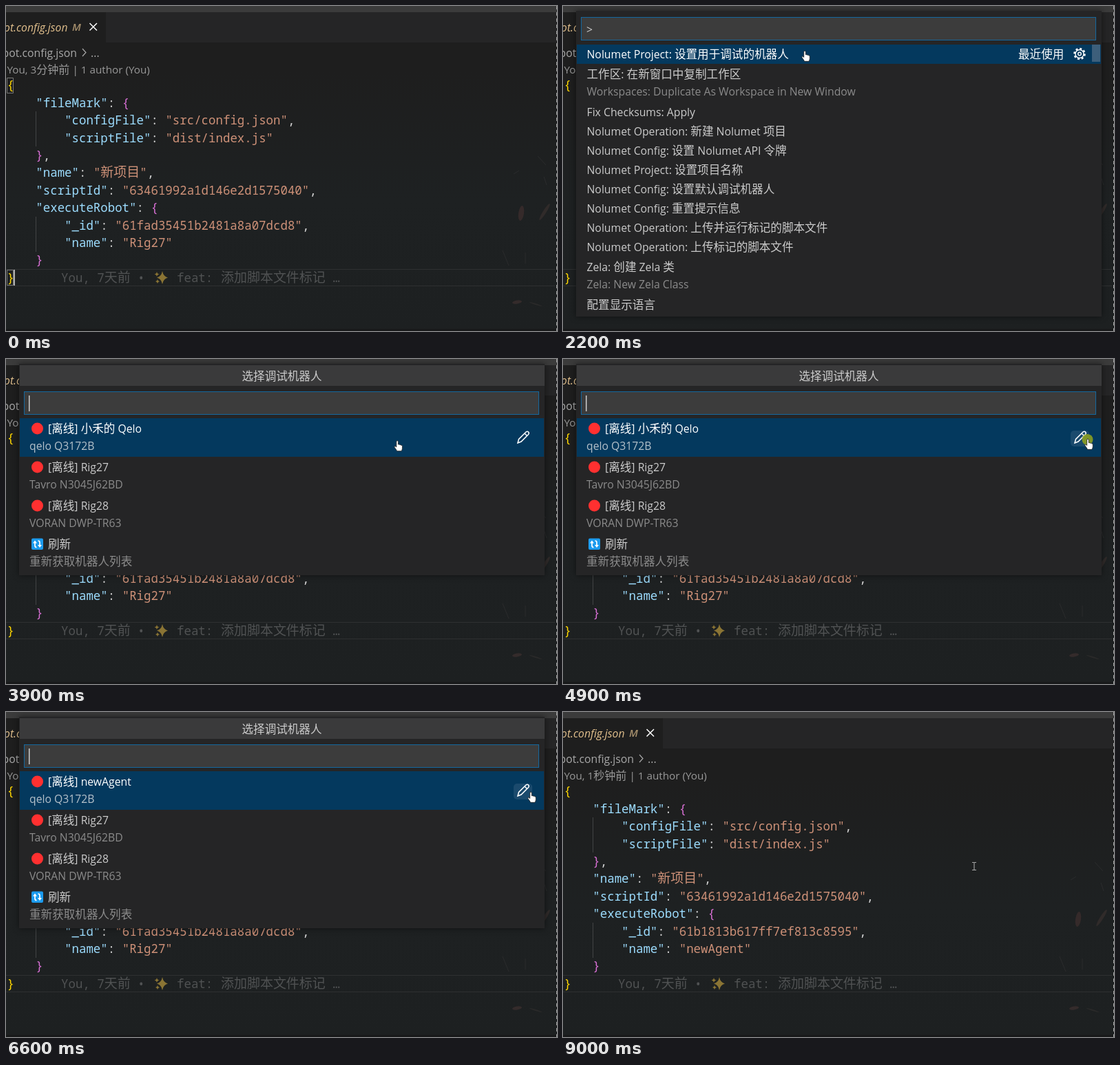
An HTML page that plays this animation: 800x472 px, repeating every 9.1 s.

```html
<!DOCTYPE html>
<html lang="zh">
<head>
<meta charset="utf-8">
<style>
  html, body { margin: 0; width: 100%; height: 100%; overflow: hidden; background: #1e1e1e; }
  svg { display: block; }
  text { white-space: pre; font-family: "Open Sans", "Noto Sans CJK SC", sans-serif; }
  .cjk { font-family: "Noto Sans CJK SC", sans-serif; font-size: 1.053em; }
  .mono { font-family: "Noto Sans Mono", "Noto Sans CJK SC", monospace; font-weight: 500; }
  .mono .cjk { font-size: 1.09em; font-weight: 300; }
  .italic { font-style: italic; }
  .end { text-anchor: end; }
  .mid { text-anchor: middle; }
  .shadow { filter: drop-shadow(0 0 5px rgba(0, 0, 0, .5)); }
</style>
</head>
<body>
<svg id="stage" width="800" height="472" viewBox="0 0 800 472"></svg>
<script>
const LOOP = 9100, STEP = 100, COL = 10.45;
const stage = document.getElementById('stage');

// Pointer path: time, x, y
const path = [
  [1600, 590, 222], [2100, 351, 66], [2800, 351, 66], [3500, 420, 112], [4100, 620, 122],
  [4700, 762, 117], [6600, 762, 117], [7500, 560, 108], [8000, 560, 108], [8800, 597, 224], [9100, 597, 224]
];
const clicks = [2400, 4900, 7700];

// Palette entries: label and optional detail
const commands = [
  ['Nolumet Project: 设置用于调试的机器人'],
  ['工作区: 在新窗口中复制工作区', 'Workspaces: Duplicate As Workspace in New Window'],
  ['Fix Checksums: Apply'],
  ['Nolumet Operation: 新建 Nolumet 项目'],
  ['Nolumet Config: 设置 Nolumet API 令牌'],
  ['Nolumet Project: 设置项目名称'],
  ['Nolumet Config: 设置默认调试机器人'],
  ['Nolumet Config: 重置提示信息'],
  ['Nolumet Operation: 上传并运行标记的脚本文件'],
  ['Nolumet Operation: 上传标记的脚本文件'],
  ['Zela: 创建 Zela 类', 'Zela: New Zela Class'],
  ['配置显示语言']
];

const rect = (x, y, w, h, fill, more = '') =>
  `<rect x="${x}" y="${y}" width="${w}" height="${h}" fill="${fill}" ${more}/>`;
const stroke = (d, color, width = 1, more = '') =>
  `<path d="${d}" fill="none" stroke="${color}" stroke-width="${width}" ${more}/>`;
const shape = (d, fill, more = '') => `<path d="${d}" fill="${fill}" ${more}/>`;
const wrap = s => s.replace(/[\u3000-\u9fff]+/g, '<tspan class="cjk">$&</tspan>');
const text = (x, y, s, fill = '#ccc', size = 15.75, cls = '', more = '') =>
  `<text x="${x}" y="${y}" fill="${fill}" font-size="${size}" class="${cls}" ${more}>${wrap(s)}</text>`;
const mono = (x, y, s, fill) => text(x, y, s, fill, 17.42, 'mono');

function codeLine(s, i) {
  const tokens = s.trim().match(/"[^"]*"|[{}]|[^"{}]+/g);
  const y = 121.3 + i * 25.4;
  let x = 1.5 + COL * s.search(/\S/);
  return tokens.map((tok, k) => {
    let color = '#d4d4d4';
    if (tok[0] === '"') color = k === 0 ? '#9cdcfe' : '#ce9178';
    else if (/[{}]/.test(tok)) color = i % 11 ? '#da70d6' : '#ffd700';
    const out = mono(x, y, tok, color);
    for (const ch of tok) x += ch > '\u3000' ? 19 : COL;
    return out;
  }).join('');
}

function backdrop() {
  const blot = (x, y, rx, ry, turn, fill) =>
    `<ellipse rx="${rx}" ry="${ry}" transform="translate(${x} ${y}) rotate(${turn})" fill="${fill}"/>`;
  return `<defs><linearGradient id="bg" x2="0" y2="1"><stop offset=".2" stop-color="#1e1e1e"/>
    <stop offset=".6" stop-color="#1e2122"/><stop offset="1" stop-color="#1d2021"/></linearGradient></defs>` +
    rect(0, 0, 800, 472, 'url(#bg)') +
    blot(748, 301, 4, 11, 8, '#352a2a') + blot(782, 299, 2.5, 14, 32, '#302b2a') +
    blot(742, 430, 7, 2.5, -8, '#342b2b') + blot(769, 433, 10, 1, 18, '#2a2a2a') +
    stroke('M721 355l9 22M754 358v16M737 244l8-5M772 218l12 13M781 248l4 12', '#2b2c2d');
}

function editor(t) {
  const saved = t >= 7900;
  const lines = [
    '{', '    "fileMark": {', '        "configFile": "src/config.json",',
    '        "scriptFile": "dist/index.js"', '    },', '    "name": "新项目",',
    '    "scriptId": "63461992a1d146e2d1575040",', '    "executeRobot": {',
    `        "_id": "${saved ? '61b1813b617ff7ef813c8595' : '61fad35451b2481a8a07dcd8'}",`,
    `        "name": "${saved ? 'newAgent' : 'Rig27'}"`, '    }', '}'
  ];
  const dim = '#505253';
  let out = backdrop() +
    rect(0, 0, 800, 9, '#3b3b3b') + rect(145, 9, 655, 44, '#252526') + rect(0, 9, 145, 44, '#1e1e1e') +
    text(89.5, 37, 'bot.config.json', '#e2c08d', 15.75, 'italic end') +
    text(96, 36, 'M', '#a58f6c', 15, 'italic', 'font-weight="600"') +
    stroke('M121.5 25l10.5 10.5M132 25l-10.5 10.5', '#fff', 1.5) +
    text(103, 73.5, 'bot.config.json', '#a9a9a9', 15.75, 'end') +
    stroke('M111 62l5 5.5l-5 5.5', '#a9a9a9', 1.2) + text(123, 73.5, '...', '#a9a9a9') +
    text(1.5, 97.5, `You, ${t >= 8700 ? '1秒钟前' : '3分钟前'} | 1 author (You)`, '#999', 15.25) +
    stroke('M0 382.5H797M0 406.5H797', '#2e3031') +
    stroke('M43.5 153v51M43.5 306v51', '#424445') +
    lines.map(codeLine).join('') +
    mono(80, 400.7, 'You, 7天前 •', dim) + mono(248, 400.7, 'feat:', dim) +
    mono(312, 400.7, '添加脚本文件标记', dim) + mono(474.5, 400.7, '…', dim) +
    shape('M227 385q1.5 8 8 9.5q-6.5 1.5-8 9.5q-1.5-8-8-9.5q6.5-1.5 8-9.5z' +
      'M219 386q.5 3 3.5 3.5q-3 .5-3.5 3.5q-.5-3-3.5-3.5q3-.5 3.5-3.5z' +
      'M220 397q.5 2.5 3 3q-2.5 .5-3 3q-.5-2.5-3-3q2.5-.5 3-3z', '#8a7434');
  if (t < 100) {
    out += stroke('M1.5 104.5h9v22h-9zM1.5 383.5h9v22h-9z', '#777') + rect(11, 383, 2, 23, '#aeafad');
  }
  return out + rect(0, 469, 800, 3, '#18191a') + stroke('M799.5 0V472', '#aaa', 1, 'stroke-dasharray="5 4"');
}

const panel = bottom => rect(19, 7, 763, bottom - 7, '#252526', 'class="shadow"');
const field = y => rect(26.5, y + .5, 747, 33, '#3c3c3c', 'stroke="#14689f"');
const heading = s => rect(20, 9, 762, 30, '#3a3a3b') + text(400.5, 31, s, '#ccc', 15.75, 'mid');
const caret = (x, y) => rect(x, y, 1.5, 23, '#ccc');
const inside = (p, y, h) => p && p.y >= y && p.y < y + h && p.x > 20 && p.x < 781;
const gear = `<g transform="translate(750 69.5)" fill="none" stroke="#fff">
  <circle r="7.5" stroke-width="2.6" stroke-dasharray="2.95 2.94"/>
  <circle r="6" stroke-width="1.4"/><circle r="2.3" stroke-width="1.4"/></g>`;

function palette(t, p) {
  let out = panel(t < 200 ? 56 : 451) + field(16) + text(34, 40, '&gt;');
  if (t < 500 || t >= 1300 && t < 1900) out += caret(43, 22);
  if (t < 200) return { out };
  let y = 56, hit = false;
  commands.forEach(([label, detail], i) => {
    const h = detail ? 56 : 28, over = inside(p, y, h);
    hit = hit || over;
    if (i === 0 || over) out += rect(20, y, 761, h, i ? '#2a2d2e' : '#04395e');
    out += text(34.5, y + (detail ? 20.5 : 20), label, i ? '#ccc' : '#fff');
    if (detail) out += text(34.5, y + 45.5, detail, '#8b8b8b');
    y += h;
  });
  out += text(661, 76, '最近使用', '#fff') + gear;
  if (t < 1000 || p) out += rect(768, 56, 12, 25, p ? '#3d5f7b' : '#2d536f');
  return { out, hit };
}

function picker(t, p) {
  const loaded = t !== 6500, since = t < 6000 ? 2800 : 6000;
  let out = panel(loaded ? 314 : 88) + heading('选择调试机器人') + field(47);
  if (Math.floor((t - since) / 600) % 2) out += caret(33, 53);
  if (!loaded) return { out };
  const rows = [
    ['[离线] ' + (t < 5000 ? '小禾的 Qelo' : 'newAgent'), 'qelo Q3172B'],
    ['[离线] Rig27', 'Tavro N3045J62BD'], ['[离线] Rig28', 'VORAN DWP-TR63'], ['刷新', '重新获取机器人列表']
  ];
  let hit = false;
  rows.forEach(([label, detail], i) => {
    const y = 86 + i * 56, over = inside(p, y, 56);
    hit = hit || over;
    if (i === 0 || over) out += rect(20, y, 761, 56, i ? '#2a2d2e' : '#04395e');
    out += i < 3 ? `<circle cx="45.5" cy="${y + 15}" r="8.5" fill="#ff3030"/>` :
      rect(37, 260.5, 17, 16.5, '#1c9bee', 'rx="2"') +
      stroke('M44.5 273.5q-2.5 0-2.5-2.5v-4M46.5 264q2.5 0 2.5 2.500v4', '#fff', 1.7) +
      shape('M39 267.5l3-4l3 4zM46 270l3 4l3-4z', '#fff');
    out += text(61, y + 21, label, i ? '#ccc' : '#fff') +
      text(34, y + 46, detail, i ? '#8b8b8b' : '#b5c1ca');
  });
  if (inside(p, 86, 56) && p.x > 738) out += rect(737, 104, 27, 23, '#1b4a6d', 'rx="5"');
  out += stroke('M743 122l1.5-5.5l10.5-10.5q2-1.5 3.5 0t0 3.5l-10.5 10.5zM753 108l3.5 3.5', '#fff', 1.5);
  return { out, hit };
}

function ime() {
  const words = [[53, '1 呢哇'], [129, '2 了(le)我'], [233, '3 呢'], [309, '4 讷'], [386, '5 那'], [462, '6 呐'], [539, '7 哪']];
  return rect(36, 77, 688, 42, '#202020', 'rx="8" class="shadow"') +
    rect(41, 83, 71, 32, '#343434', 'rx="5"') + rect(41, 91, 3, 16, '#8a8a8a', 'rx="1.5"') +
    words.map(([x, s]) => text(x, 105.5, s, '#f2f2f2', 16.3)).join('') +
    stroke('M603.5 78v40M682.5 78v40', '#383838') +
    shape('M628 94.5v10l-8-5z', '#666') + shape('M657 94v11l8.5-5.5z', '#fff') +
    stroke('M704 91h-5q-3 0-3 3v10q0 3 3 3h10q3 0 3-3v-3', '#fff', 1.6) +
    shape('M707.5 101l-6-6q-1.5-4 2-5.5q2.5-.5 4 2q1.5-2.5 4-2q3.5 1.5 2 5.5z', '#fff');
}

function prompt(t) {
  const draft = ['', 'n', 'ne', "ne'w", "ne'w", 'new'];
  const k = Math.floor((t - 5000) / STEP);
  const typed = draft[k] ?? 'newAgent'.slice(0, 3 + Math.ceil((k - 5) * .7));
  const composing = t >= 5100 && t < 5500;
  let out = panel(113) + heading('新机器人名称') + field(47) +
    text(33, 70, typed, '#ccc', 15.75, '', 'id="typed"') +
    text(34, 106, "按 'Enter' 以确认或按 'Esc' 以取消");
  if (composing) out += stroke('M33 74.5H67', '#999', 1, 'id="under" stroke-dasharray="2 1"') + ime();
  return { out: out + `<g id="caret">${caret(0, 53)}</g>` };
}

function placeCaret() {
  const typed = document.getElementById('typed');
  if (!typed) return;
  const end = 33 + (typed.textContent ? typed.getComputedTextLength() : 0);
  document.getElementById('caret').setAttribute('transform', `translate(${end} 0)`);
  document.getElementById('under')?.setAttribute('d', `M33 74.5H${end}`);
}

function pointerAt(t) {
  if (t < path[0][0]) return null;
  const i = path.findIndex(([time]) => time > t);
  const [t0, x0, y0] = path[i - 1], [t1, x1, y1] = path[i];
  const u = (t - t0) / (t1 - t0), e = u * u * (3 - 2 * u);
  return { x: x0 + (x1 - x0) * e, y: y0 + (y1 - y0) * e };
}

function pointer(t, p, hand) {
  if (!p) return '';
  let out = `<g transform="translate(${p.x} ${p.y})">`;
  if (clicks.includes(t)) out += '<circle r="8" cx="-.5" fill="#93a51d" opacity=".85"/>';
  out += hand
    ? shape('M-1.5 1q0-2 1.5-2t1.5 2v4q1.5-.8 2.5 .5q1.5-.6 2.3 .6q1.9-.4 2 1.5v3.5q-.3 2-1.5 4H-.5' +
      'q-1.2-2.5-4-5.5q-.8-1.8 .8-2.2l2.2 1.500z', '#fff', 'stroke="#222" stroke-width=".9" transform="scale(.88 .95)"')
    : stroke('M-3-5.5h2.3l.7 .6l.7-.6H3M0-5v10M-3 5.5h2.3l.7-.6l.7 .6H3', '#a8a8a8', 1.1);
  return out + '</g>';
}

function overlay(t, p) {
  if (t < 100 || t >= 7800 || t >= 2600 && t < 2800) return { out: '' };
  if (t < 2600) return palette(t, p);
  return t >= 5000 && t < 6500 ? prompt(t) : picker(t, p);
}

const start = performance.now();
let last = -1;
function frame(now) {
  const t = Math.floor(Math.max(0, now - start) % LOOP / STEP) * STEP;
  if (t !== last) {
    last = t;
    const p = pointerAt(t), top = overlay(t, p);
    stage.innerHTML = editor(t) + top.out + pointer(t, p, top.hit);
    placeCaret();
  }
  requestAnimationFrame(frame);
}
frame(start);
</script>
</body>
</html>
```
